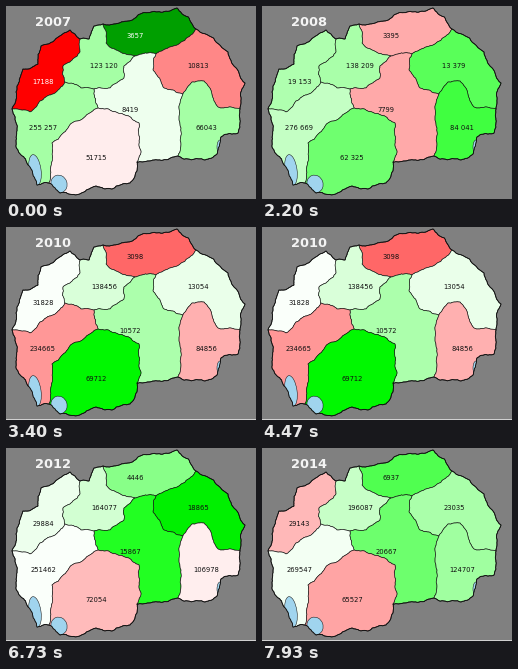
Recreate the animation shown at these times as a matplotlib script. Size 250 px wide and 193 px high, loop 8 s.

```python
import numpy as np
import matplotlib.pyplot as plt
from matplotlib.animation import FuncAnimation
from matplotlib.patches import Ellipse, Polygon, Rectangle

W, H, DPI = 250, 193, 100
FRAMES, LOOP_MS = 200, 8000
STEP_MS = LOOP_MS / FRAMES
YEAR_MS = 3400 / 3
FIRST_YEAR = 2007
rng = np.random.default_rng(4)

# Key points of the national border, clockwise, one arc per region
BORDER = {
    "polog": [(6, 103), (11, 80), (17, 63), (32, 58), (35, 40), (64, 24), (74, 33)],
    "skopje": [(74, 33), (83, 33), (88, 20), (97, 18)],
    "north": [(97, 18), (122, 15), (145, 6), (171, 2), (190, 23)],
    "east": [(190, 23), (222, 46), (239, 77), (234, 103)],
    "southeast": [(234, 103), (232, 127), (215, 131), (211, 148), (199, 154), (172, 150)],
    "vardar": [(172, 150), (152, 154), (131, 156)],
    "pelagonia": [(131, 156), (131, 165), (124, 177), (106, 183), (90, 180), (78, 186),
                  (54, 187), (43, 177)],
    "southwest": [(43, 177), (31, 179), (24, 161), (10, 141), (11, 119), (6, 103)],
}

# Boundaries shared by two regions
INNER = {
    "pol_sk": [(74, 33), (74, 46), (57, 60), (59, 76)],
    "pol_sw": [(59, 76), (47, 88), (34, 95), (24, 106), (6, 103)],
    "sk_sw": [(59, 76), (75, 82), (88, 83)],
    "sk_var": [(88, 83), (104, 82), (118, 72), (118, 60), (129, 50)],
    "sk_ne": [(129, 50), (100, 37), (97, 18)],
    "ne_var": [(129, 50), (150, 48)],
    "ne_e": [(150, 48), (164, 41), (190, 23)],
    "e_var": [(150, 48), (147, 64), (158, 82), (177, 88)],
    "e_se": [(177, 88), (186, 76), (198, 75), (212, 101), (234, 103)],
    "se_var": [(177, 88), (174, 118), (172, 150)],
    "var_sw": [(88, 83), (92, 102)],
    "var_pel": [(92, 102), (110, 106), (133, 117), (135, 145), (131, 156)],
    "sw_pel": [(92, 102), (66, 117), (46, 137), (45, 160), (43, 177)],
}

# Region: label position, and its ring of arcs ("-" walks an arc backwards)
REGIONS = {
    "north": ((129, 30), "north -ne_e -ne_var sk_ne"),
    "polog": ((37.5, 75.5), "polog pol_sk pol_sw"),
    "skopje": ((98, 59.5), "skopje -sk_ne -sk_var -sk_sw -pol_sk"),
    "east": ((192, 60), "east -e_se -e_var ne_e"),
    "vardar": ((124, 103.5), "vardar -var_pel -var_sw sk_var ne_var e_var se_var"),
    "southwest": ((37, 121), "southwest -pol_sw sk_sw var_sw sw_pel"),
    "southeast": ((200, 121), "southeast -se_var e_se"),
    "pelagonia": ((90, 152), "pelagonia -sw_pel var_pel"),
}

# Yearly counts, in the order of REGIONS; the first row is only a baseline
COUNTS = np.array([
    [2438, 22100, 109050, 12050, 8220, 226100, 58500, 52500],
    [3657, 17188, 123120, 10813, 8419, 255257, 66043, 51715],
    [3395, 19153, 138209, 13379, 7799, 276669, 84041, 62325],
    [3560, 31596, 131268, 12680, 9448, 257480, 90998, 50740],
    [3098, 31828, 138456, 13054, 10572, 234665, 84856, 69712],
    [3803, 29153, 154163, 13615, 12064, 249746, 108555, 76469],
    [4446, 29884, 164077, 18865, 15867, 251462, 106978, 72054],
    [5549, 31012, 181698, 20547, 17114, 264990, 109874, 71010],
    [6937, 29143, 196087, 23035, 20667, 269547, 124707, 65527],
])
GROWTH = COUNTS[1:] / COUNTS[:-1] - 1

# Smallest count written with a thousands gap
GAP_FROM = {2007: 100_000, 2008: 10_000}


def jagged(points, levels=4, amount=0.1):
    """Roughen a polyline by midpoint displacement, keeping its ends."""
    p = np.array(points, float)
    for _ in range(levels):
        step = np.diff(p, axis=0)
        normal = np.column_stack([-step[:, 1], step[:, 0]])
        mid = p[:-1] + step / 2 + normal * rng.uniform(-amount, amount, (len(step), 1))
        out = np.empty((2 * len(p) - 1, 2))
        out[::2], out[1::2] = p, mid
        p = out
    return p


def ring(spec):
    return np.vstack([arcs[n[1:]][::-1] if n[0] == "-" else arcs[n] for n in spec.split()])


def tint(growth):
    """White at zero, red when falling, green when rising, dark green beyond."""
    if growth < 0:
        fade = max(0, 1 + 4.6 * growth)
        return (1, fade, fade)
    depth = 2.75 * growth
    return (max(0, 1 - depth), min(1, 2 - depth), max(0, 1 - depth))


def caption(count, year):
    if count >= GAP_FROM.get(year, np.inf):
        return f"{count:,}".replace(",", " ")
    return str(count)


def px(size):
    return size * 72 / DPI


fig = plt.figure(figsize=(W / DPI, H / DPI), dpi=DPI, facecolor="#808080")
ax = fig.add_axes([0, 0, 1, 1])
ax.set(xlim=(0, W), ylim=(H, 0))
ax.axis("off")

arcs = {name: jagged(pts) for name, pts in {**BORDER, **INNER}.items()}
edge = dict(ec="#111111", joinstyle="round")
patches = [ax.add_patch(Polygon(ring(spec), lw=px(0.6), **edge)) for _, spec in REGIONS.values()]
outline = ax.add_patch(Polygon(ring(" ".join(BORDER)), fill=False, lw=px(0.9), zorder=3, **edge))

for x, y, w, h, tilt in [(29, 164, 12, 31, -8), (53, 178, 16, 18, -20), (214, 141, 6, 14, 0)]:
    lake = ax.add_patch(Ellipse((x, y), w, h, angle=tilt, fc="#a0d4ee", lw=px(0.5), zorder=2, ec="#111111"))
    lake.set_clip_path(outline)

rim = ax.add_patch(Rectangle((0, H - 1), W, 1, fc="#d0d0d0", lw=0))
style = dict(family="DejaVu Sans", ha="center", va="center_baseline", zorder=4)
title = ax.text(47.5, 15, "", color="#f4f4f4", weight="bold", size=px(13), **style)
labels = [ax.text(*at, "", size=px(6.8), **style) for at, _ in REGIONS.values()]


def update(i):
    n = int((i + 1) * STEP_MS / YEAR_MS)
    year = FIRST_YEAR + n
    title.set_text(str(year))
    rim.set_visible(year >= 2010)
    for patch, label, count, growth in zip(patches, labels, COUNTS[n + 1], GROWTH[n]):
        color = tint(growth)
        patch.set_facecolor(color)
        label.set_text(caption(count, year))
        label.set_color("white" if sum(color) < 1.4 and color[1] < 0.8 else "#101010")
    return [title, rim, *patches, *labels]


anim = FuncAnimation(fig, update, frames=FRAMES, interval=STEP_MS, repeat=True, repeat_delay=0)
plt.show()
```
